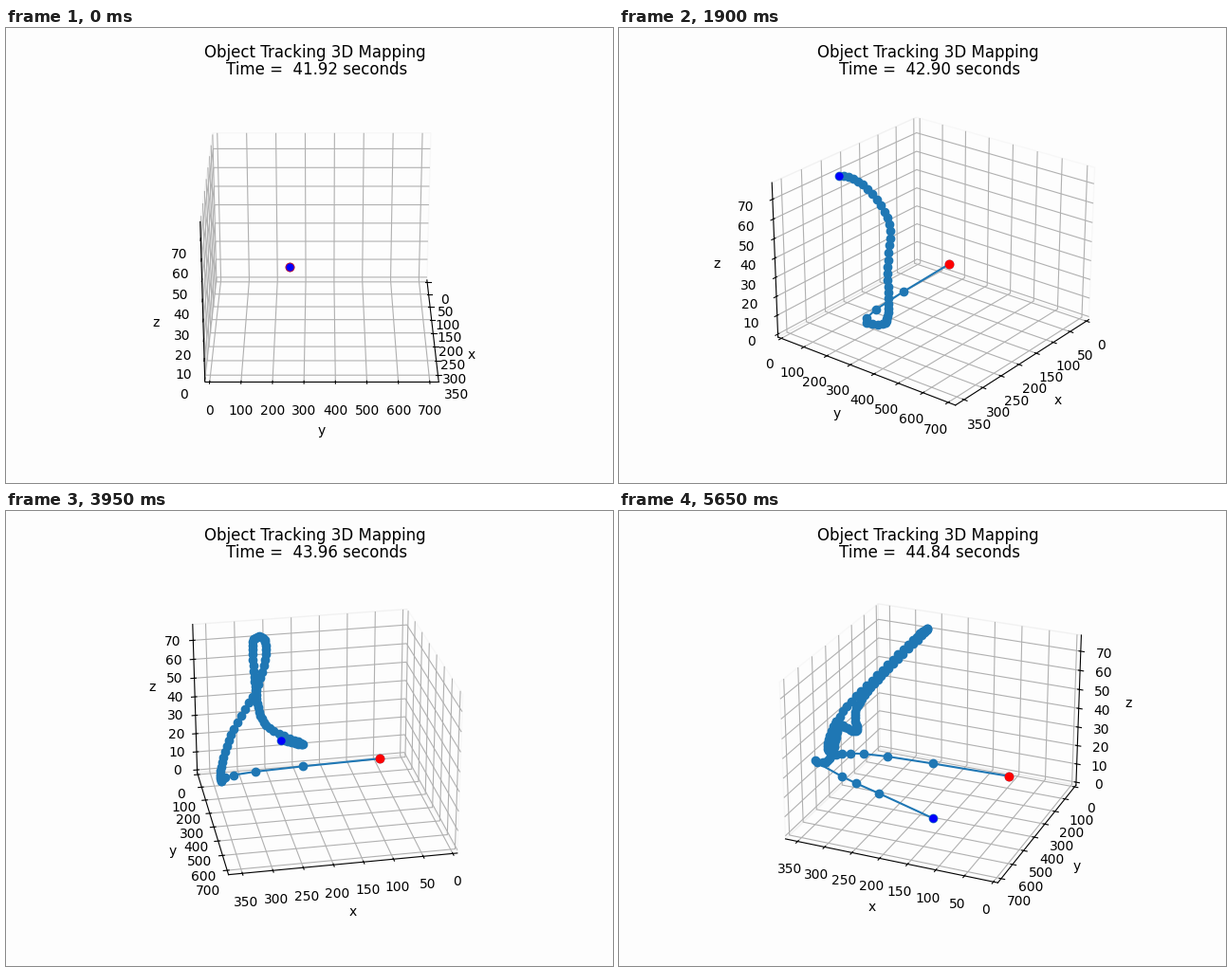
Write a matplotlib script that moves like this. It is 640 px wide and 480 px high and loops after 5.7 s.

```python
import numpy as np
import matplotlib.pyplot as plt
from matplotlib.animation import FuncAnimation

N = 114
STEP_MS = 50
STEPS = np.arange(N)

# Key points of the tracked path: step, x, y, z
KEYS = np.array([
    (0, 360, 247, 16.2), (2, 360, 276, 16.9), (7, 360, 418, 23.6),
    (11, 363, 443, 29), (20, 335, 401, 48.8), (26, 292, 339, 63.4),
    (36, 258, 117, 75.5), (42, 270, 26, 70.7), (51, 288, 266, 63.3),
    (62, 290, 513, 56.6), (71, 247, 692, 58.1), (79, 280, 684, 60),
    (93, 333, 481, 42.4), (107, 353, 519, 25.7), (109, 358, 543, 27),
    (110, 307, 562, 23.7), (112, 228, 606, 22), (113, 125, 636, 17),
])


def smooth(t, keys, values):
    """Cubic Hermite curve through the keys with finite-difference slopes."""
    slope = np.gradient(values, keys)
    k = np.clip(np.searchsorted(keys, t, side="right") - 1, 0, len(keys) - 2)
    h = keys[k + 1] - keys[k]
    s = (t - keys[k]) / h
    return ((1 + 2 * s) * (1 - s) ** 2 * values[k]
            + s * (1 - s) ** 2 * h * slope[k]
            + s ** 2 * (3 - 2 * s) * values[k + 1]
            + s ** 2 * (s - 1) * h * slope[k + 1])


path = np.array([smooth(STEPS, KEYS[:, 0], KEYS[:, c]) for c in (1, 2, 3)])
path[0] -= 291 * np.exp(-0.64 * STEPS ** 1.15)  # fast entry along x

fig = plt.figure(figsize=(6.4, 4.8), dpi=100, facecolor="#fdfdfd")
ax = fig.add_subplot(projection="3d", facecolor="none")
ax.set(xlim=(-7.6, 372.6), ylim=(-15, 728.5), zlim=(-1.6, 78.3),
       xlabel="x", ylabel="y", zlabel="z")
for axis in (ax.xaxis, ax.yaxis, ax.zaxis):
    axis.pane.fill = False

trail, = ax.plot([], [], [], "o-", color="C0", zorder=3)
ax.plot(*path[:, :1], "o", color="red", zorder=4)
head, = ax.plot([], [], [], "o", color="blue", ms=4.5, mew=1.5, zorder=5)


def update(i):
    trail.set_data_3d(*path[:, :i + 1])
    head.set_data_3d(*path[:, i:i + 1])
    ax.view_init(elev=25, azim=i)
    seconds = 41.92 + 2.92 * i / (N - 1)
    ax.set_title(f"Object Tracking 3D Mapping \nTime =  {seconds:.2f} seconds",
                 linespacing=1.0)
    return trail, head


anim = FuncAnimation(fig, update, frames=N, interval=STEP_MS,
                     repeat=True, repeat_delay=0, blit=False)
plt.show()
```
